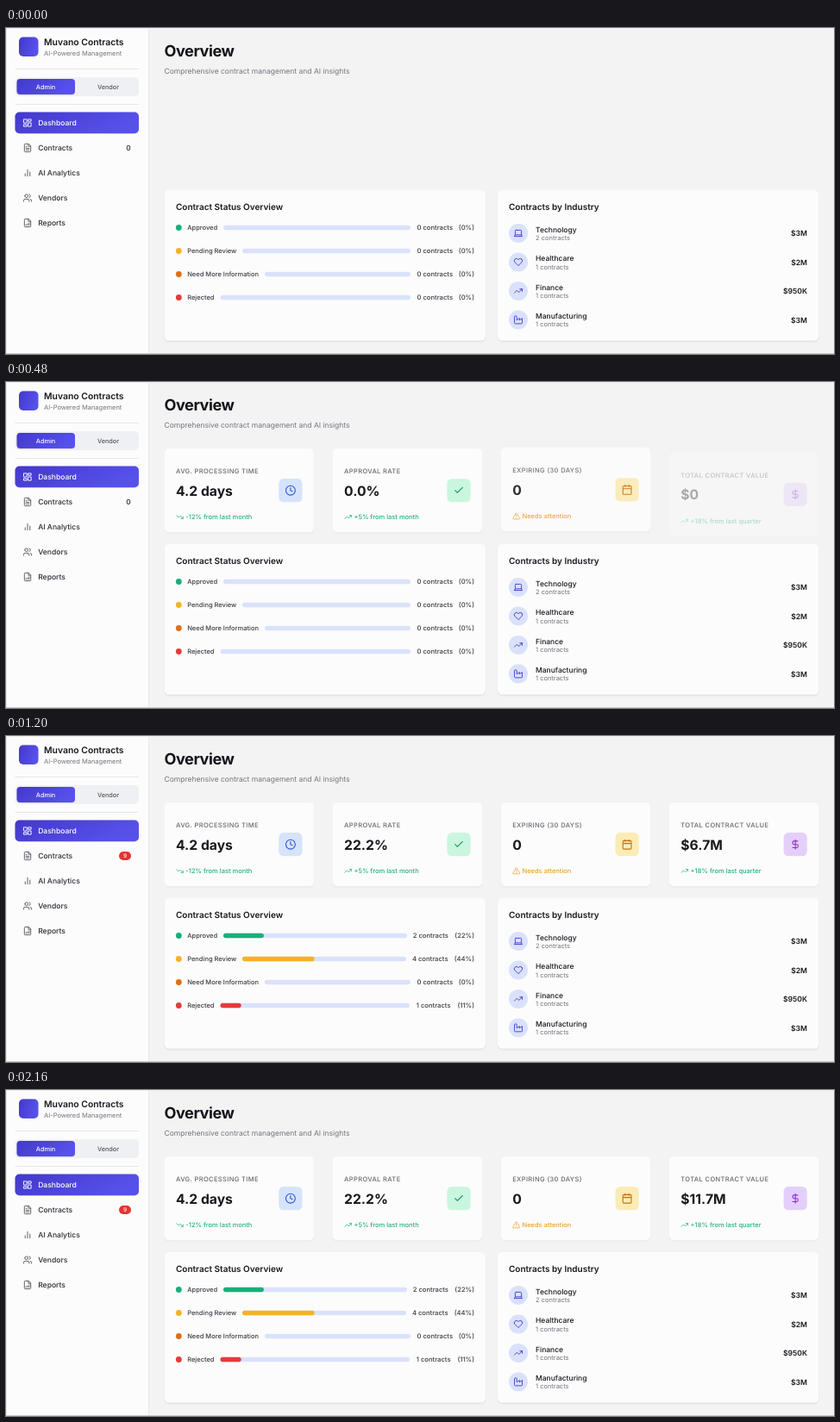
Write an HTML page that moves like this. It is 960 px wide and 378 px high and loops after 2240 ms.

```html
<!DOCTYPE html>
<html lang="en">
<head>
<meta charset="utf-8">
<title>Contract dashboard</title>
<style>
  html, body { margin: 0; width: 100%; height: 100%; overflow: hidden; background: #f3f3f4; }
  svg { display: block; width: 960px; height: 378px; font-family: Inter, "Liberation Sans", sans-serif; }
  text { text-rendering: geometricPrecision; }
</style>
</head>
<body>
<svg id="stage" viewBox="0 0 960 378">
  <defs>
    <linearGradient id="indigo" x1="0" y1="0" x2="1" y2="0.35">
      <stop offset="0" stop-color="#4338ca"/>
      <stop offset="1" stop-color="#5751eb"/>
    </linearGradient>
  </defs>
</svg>
<script>
const LOOP = 2240, STEP = 80;
const DATA_AT = 575, BAR_MS = 500;
const INK = '#18181f', GREY = '#74747d', GREEN = '#22b07d', AMBER = '#f0a028';
const stage = document.getElementById('stage');

// Outline icons on a 24 unit grid
const ICONS = {
  grid: 'M3 3h7v9H3zM14 3h7v5h-7zM14 12h7v9h-7zM3 16h7v5H3z',
  file: 'M14 2H6a2 2 0 0 0-2 2v16a2 2 0 0 0 2 2h12a2 2 0 0 0 2-2V8zM14 2v6h6M8 13h8M8 17h8M8 9h2',
  bars: 'M18 20V10M12 20V4M6 20v-6',
  users: 'M16 21v-2a4 4 0 0 0-4-4H6a4 4 0 0 0-4 4v2M5 7a4 4 0 1 0 8 0a4 4 0 1 0-8 0M22 21v-2a4 4 0 0 0-3-3.9M16 3.1a4 4 0 0 1 0 7.8',
  report: 'M14 2H6a2 2 0 0 0-2 2v16a2 2 0 0 0 2 2h12a2 2 0 0 0 2-2V8zM14 2v6h6M8 18v-2M12 18v-4M16 18v-6',
  clock: 'M2 12a10 10 0 1 0 20 0a10 10 0 1 0-20 0M12 6v6l4 2',
  check: 'M20 6L9 17l-5-5',
  calendar: 'M5 4h14a2 2 0 0 1 2 2v14a2 2 0 0 1-2 2H5a2 2 0 0 1-2-2V6a2 2 0 0 1 2-2zM16 2v4M8 2v4M3 10h18',
  dollar: 'M12 2v20M17 5H9.5a3.5 3.5 0 0 0 0 7h5a3.5 3.5 0 0 1 0 7H6',
  down: 'M22 17l-8.5-8.5-5 5L2 7M16 17h6v-6',
  up: 'M22 7l-8.5 8.5-5-5L2 17M16 7h6v6',
  warn: 'M10.3 3.9L1.8 18a2 2 0 0 0 1.7 3h17a2 2 0 0 0 1.7-3L13.7 3.9a2 2 0 0 0-3.4 0zM12 9v4M12 17h.01',
  laptop: 'M6 4h12a2 2 0 0 1 2 2v10H4V6a2 2 0 0 1 2-2zM2 20h20l-2-4M4 16l-2 4',
  heart: 'M20.8 4.6a5.5 5.5 0 0 0-7.8 0L12 5.7l-1-1.1a5.5 5.5 0 0 0-7.8 7.8L12 21.2l8.8-8.8a5.5 5.5 0 0 0 0-7.8z',
  factory: 'M2 20a2 2 0 0 0 2 2h16a2 2 0 0 0 2-2V8l-7 5V8l-7 5V4a2 2 0 0 0-2-2H4a2 2 0 0 0-2 2z'
};

function add(parent, tag, attrs) {
  const el = document.createElementNS('http://www.w3.org/2000/svg', tag);
  for (const key in attrs) el.setAttribute(key, attrs[key]);
  parent.append(el);
  return el;
}
const group = parent => add(parent, 'g', {});
const rect = (parent, x, y, width, height, fill, rx = 0) =>
  add(parent, 'rect', { x, y, width, height, fill, rx });

function text(parent, str, x, y, size, weight = 400, fill = INK, more = {}) {
  const el = add(parent, 'text', { x, y, 'font-size': size, 'font-weight': weight, fill, ...more });
  el.textContent = str;
  return el;
}
function icon(parent, name, cx, cy, size, stroke) {
  add(parent, 'path', {
    d: ICONS[name], fill: 'none', stroke, 'stroke-width': 2,
    'stroke-linecap': 'round', 'stroke-linejoin': 'round',
    transform: `translate(${cx - size / 2} ${cy - size / 2}) scale(${size / 24})`
  });
}
function panel(parent, x, y, w, h, shade) {
  rect(parent, x - 0.5, y + 0.5, w + 1, h + 1.5, `rgba(0,0,0,${shade})`, 6);
  rect(parent, x, y + 0.5, w, h + 0.4, `rgba(0,0,0,${shade})`, 5.5);
  rect(parent, x, y, w, h, '#fcfcfc', 5.5);
}
const END = { 'text-anchor': 'end' }, MIDDLE = { 'text-anchor': 'middle' };

// Sidebar and page frame
rect(stage, 0, 0, 960, 378, '#f3f3f4');
rect(stage, 0, 0, 165, 378, '#fcfcfc');
rect(stage, 165, 0, 1, 378, '#e8e8ec');
rect(stage, 0, 0, 960, 1, '#ececee');
rect(stage, 0, 0, 1, 378, '#e6e6e8');
rect(stage, 0, 377, 960, 1, '#c9c9cb');

rect(stage, 15, 10.5, 22.5, 22.5, 'url(#indigo)', 5);
text(stage, 'Muvano Contracts', 44, 20, 10.4, 600);
text(stage, 'AI-Powered Management', 44, 32.3, 7.5, 400, GREY);
rect(stage, 10.5, 47, 143.5, 1, '#e6e7ea');
rect(stage, 10.5, 88, 143.5, 1, '#e6e7ea');
rect(stage, 10.5, 57, 143.5, 22, '#eff0f3', 5);
rect(stage, 12.5, 59.5, 67.5, 18.5, 'rgba(0,0,0,.1)', 4);
rect(stage, 12.5, 58.9, 67.5, 18.2, 'url(#indigo)', 4);
text(stage, 'Admin', 46, 70.5, 7.3, 500, '#fff', MIDDLE);
text(stage, 'Vendor', 118.5, 70.5, 7.3, 500, '#55555e', MIDDLE);

rect(stage, 10.5, 98, 143.5, 25, 'rgba(0,0,0,.08)', 5);
rect(stage, 10.5, 97.5, 143.5, 24.8, 'url(#indigo)', 5);
[['Dashboard', 'grid'], ['Contracts', 'file'], ['AI Analytics', 'bars'], ['Vendors', 'users'], ['Reports', 'report']]
  .forEach(([label, name], i) => {
    const y = 110 + 29 * i;
    icon(stage, name, 25, y, 11, i ? '#55555e' : '#fff');
    text(stage, label, 37.2, y + 3.1, 8.55, 500, i ? '#2c2c34' : '#fff');
  });
const zeroCount = text(stage, '0', 142, 142.1, 8.45, 500, '#2c2c34', MIDDLE);
const badge = group(stage);
rect(badge, 131, 134, 14, 10, '#e23333', 5);
text(badge, '9', 138, 141.3, 6.4, 500, '#fff', MIDDLE);

text(stage, 'Overview', 183.5, 33.2, 18.1, 700, '#121219', { 'letter-spacing': '-.025em' });
text(stage, 'Comprehensive contract management and AI insights', 183.5, 53, 8.5, 400, GREY);

// Stat cards
const cards = [
  ['AVG. PROCESSING TIME', '4.2 days', 'clock', '#d5e4fc', '#2f52d4', 'down', '-12% from last month', GREEN],
  ['APPROVAL RATE', '0.0%', 'check', '#caf6df', '#12915f', 'up', '+5% from last month', GREEN],
  ['EXPIRING (30 DAYS)', '0', 'calendar', '#fbecb6', '#c8700f', 'warn', 'Needs attention', AMBER],
  ['TOTAL CONTRACT VALUE', '$0', 'dollar', '#e4cffb', '#8d2fd3', 'up', '+18% from last quarter', GREEN]
].map(([label, value, name, tile, stroke, trend, note, tint], i) => {
  const g = group(stage), x = 183.5 + 195.1 * i;
  panel(g, x, 77, 173.5, 97.2, .02);
  text(g, label, x + 13.5, 106, 7.5, 500, '#66666f', { 'letter-spacing': '.05em' });
  const valueText = text(g, value, x + 13.5, 131.7, 15.7, 700);
  rect(g, x + 132.8, 112.1, 27.2, 27.2, tile, 5.5);
  icon(g, name, x + 146.4, 125.7, 13, stroke);
  icon(g, trend, x + 18, 156.5, 9, tint);
  text(g, note, x + 24.8, 159.3, 7.5, 500, tint);
  return { g, valueText, start: 35 + 124 * i };
});

// Contract status
panel(stage, 183.5, 188, 372.5, 174.5, .04);
text(stage, 'Contract Status Overview', 197, 211.4, 10, 600);
const rows = [
  ['Approved', '#1bae78', 252, 2, 22, 465, 513],
  ['Pending Review', '#f5b324', 274, 4, 44, 464, 512.5],
  ['Need More Information', '#df6f18', 300, 0, 0, 469, 518],
  ['Rejected', '#e53a3a', 248.5, 1, 11, 468, 515.5]
].map(([label, color, x, count, percent, trackEnd, countEnd], i) => {
  const y = 231.5 + 27 * i;
  add(stage, 'circle', { cx: 200.3, cy: y, r: 3.4, fill: color });
  text(stage, label, 210.2, y + 2.8, 7.5, 500, '#3b3b43');
  return {
    x, count, percent, trackEnd, countEnd,
    track: rect(stage, x, y - 2.8, 0, 5.6, '#dae2fb', 2.8),
    fill: rect(stage, x, y - 2.8, 0, 5.6, color, 2.8),
    countText: text(stage, '', 518, y + 2.8, 7.65, 500, '#3b3b43', END),
    percentText: text(stage, '', 543, y + 2.8, 7.65, 500, '#3b3b43', END)
  };
});

// Industries
panel(stage, 570, 188, 372.5, 174.5, .04);
text(stage, 'Contracts by Industry', 583, 211.4, 10, 600);
[['Technology', 2, '$3M', 'laptop'], ['Healthcare', 1, '$2M', 'heart'],
 ['Finance', 1, '$950K', 'up'], ['Manufacturing', 1, '$3M', 'factory']]
  .forEach(([label, count, value, name], i) => {
    const y = 238 + 33.45 * i;
    add(stage, 'circle', { cx: 594, cy: y, r: 11, fill: '#dae1fb' });
    icon(stage, name, 594, y, 10.8, '#4038ca');
    text(stage, label, 614, y - 1.2, 8.5, 500);
    text(stage, `${count} contracts`, 614, y + 8.1, 7.5, 400, GREY);
    text(stage, value, 929, y + 3.3, 8.6, 600, INK, END);
  });

// CSS-style cubic bezier, solved by bisection
function bezier(x1, y1, x2, y2) {
  const at = (a, b, s) => 3 * a * s * (1 - s) ** 2 + 3 * b * s * s * (1 - s) + s ** 3;
  return x => {
    if (x <= 0) return 0;
    if (x >= 1) return 1;
    let lo = 0, hi = 1;
    for (let i = 0; i < 24; i++) {
      const mid = (lo + hi) / 2;
      if (at(x1, x2, mid) < x) lo = mid; else hi = mid;
    }
    return at(y1, y2, lo);
  };
}
const fade = bezier(.25, .1, .35, 1);
const barEase = bezier(.4, 0, .2, 1);

// Underdamped spring from 1 to 0
function spring(ms) {
  const s = Math.max(0, ms) / 1000, decay = 14, w = 17.4;
  return Math.exp(-decay * s) * (Math.cos(w * s) + decay / w * Math.sin(w * s));
}
const totalValue = t =>
  `$${(11.74 * Math.sin(Math.min(Math.PI / 2, (t - 550) * .00094))).toFixed(1)}M`;

function draw(t) {
  const loaded = t >= DATA_AT;
  cards.forEach(({ g, start }) => {
    g.setAttribute('opacity', fade((t - start) / 300));
    g.setAttribute('transform', `translate(0 ${12 * spring(t - start)})`);
  });
  cards[1].valueText.textContent = loaded ? '22.2%' : '0.0%';
  cards[3].valueText.textContent = loaded ? totalValue(t) : '$0';
  zeroCount.setAttribute('opacity', loaded ? 0 : 1);
  badge.setAttribute('opacity', loaded ? 1 : 0);

  const grow = barEase((t - DATA_AT) / BAR_MS);
  for (const row of rows) {
    const width = (loaded ? row.trackEnd : 469) - row.x;
    row.track.setAttribute('width', width);
    row.fill.setAttribute('width', width * row.percent / 100 * grow);
    row.countText.setAttribute('x', loaded ? row.countEnd : 518);
    row.countText.textContent = `${loaded ? row.count : 0} contracts`;
    row.percentText.textContent = `(${loaded ? row.percent : 0}%)`;
  }
}

function tick() {
  const t = performance.now() % LOOP;
  draw(Math.floor(t / STEP) * STEP);
  requestAnimationFrame(tick);
}
tick();
</script>
</body>
</html>
```
